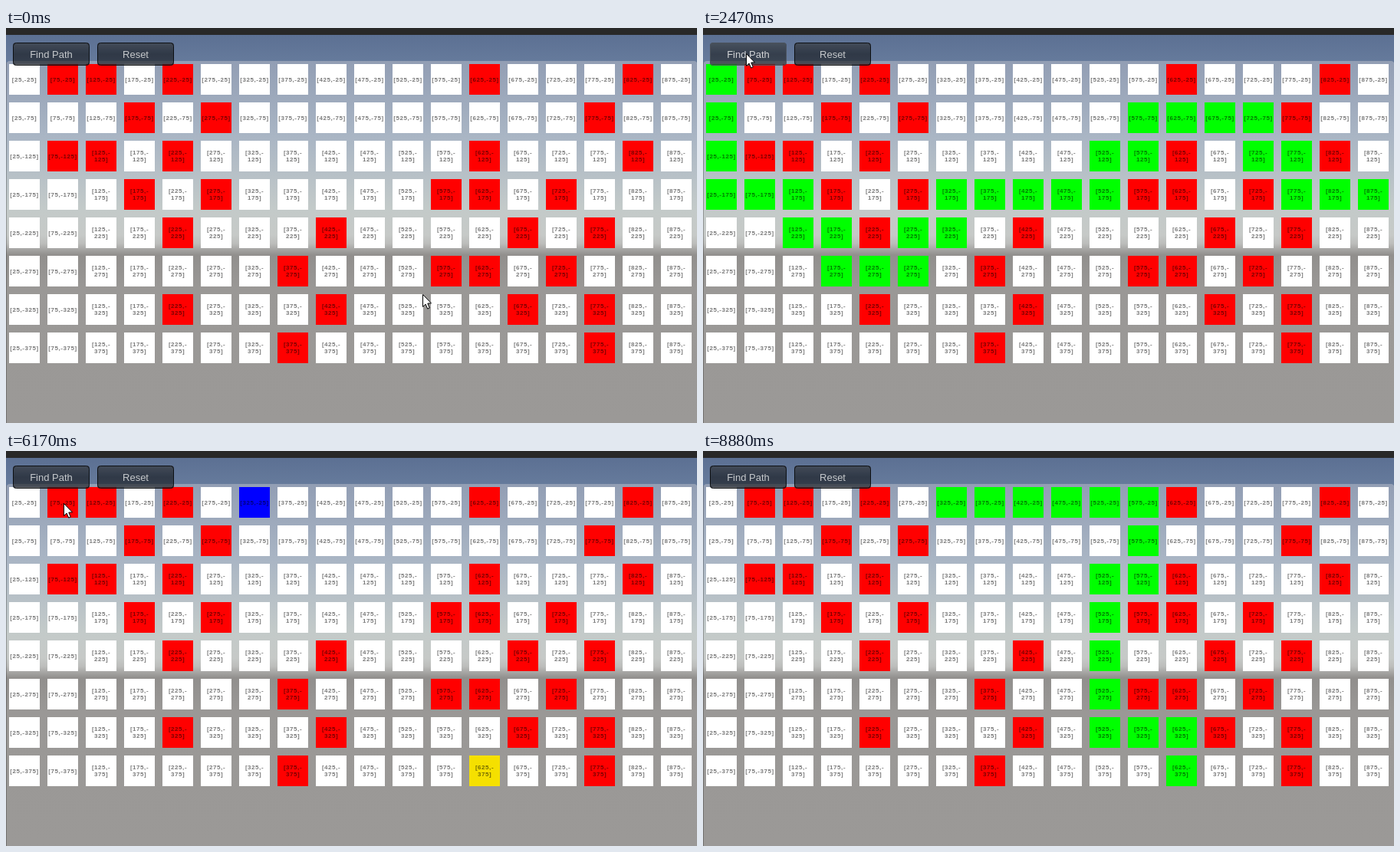
An HTML page with a canvas that plays this animation: 901 px wide and 515 px high, repeating every 9.43 s.

```html
<!DOCTYPE html>
<html lang="en">
<head>
<meta charset="utf-8">
<title>Grid path finder</title>
<style>
html, body { margin: 0; width: 100%; height: 100%; overflow: hidden; background: #9b9997; }
canvas { display: block; width: 901px; height: 515px; }
</style>
</head>
<body>
<canvas id="stage" width="901" height="515"></canvas>
<script>
const ctx = document.getElementById('stage').getContext('2d');
const W = 901, H = 515, LOOP = 9430, TICKS = 122;
const STEP = LOOP / TICKS;
const BLUE = '#0000ff', YELLOW = '#f5e000', GREEN = '#00ff00', RED = '#ff0000';

const WALLS = [
  '.##.#.......#...#.',
  '...#.#.........#..',
  '.##.#.......#...#.',
  '...#.#.....##.#...',
  '....#...#....#.#..',
  '.......#...##.#...',
  '....#...#....#.#..',
  '.......#.......#..'
];

// Follows letters U, D, L, R from a starting cell; cells are "col,row" keys.
function walk(col, row, turns) {
  const cells = [`${col},${row}`];
  for (const turn of turns) {
    col += (turn === 'R') - (turn === 'L');
    row += (turn === 'D') - (turn === 'U');
    cells.push(`${col},${row}`);
  }
  return cells;
}
const longPath = walk(0, 0, 'DDDRRDRDRRURURRRRURURRRDRDRR');
const shortPath = walk(6, 0, 'RRRRRDDLDDDDRRD');

// The pointer's script: each call moves the clock on by some ticks.
const moves = [], presses = [];
let clock = 0, tip = [543, 347];

function go(ticks, x, y) {
  moves.push({ from: clock, to: clock + ticks, a: tip, b: [x, y] });
  clock += ticks;
  tip = [x, y];
}
function wait(ticks) { clock += ticks; }
function press(color, cells) {
  presses.push({ down: clock + 1, up: clock + 2, color, cells });
  clock += 2;
}
function choose(color, path) { press(color, [path.at(color === BLUE ? 0 : -1)]); }
function reset() { press(null, []); }

go(4, 14, 66);
choose(BLUE, longPath);
go(6, 720, 256);
go(3, 870, 212);
choose(YELLOW, longPath);
go(12, 56, 33);
wait(1);
press(GREEN, longPath);
wait(5);
go(6, 614, 174);
go(9, 190, 25);
reset();
go(4, 322, 65);
choose(BLUE, shortPath);
go(6, 662, 421);
go(3, 622, 415);
choose(YELLOW, shortPath);
go(9, 75, 68);
go(4, 78, 44);
press(GREEN, shortPath);
wait(3);
go(2, 61, 44);
wait(1);
go(4, 306, 9);
go(3, 269, 19);
wait(3);
go(4, 392, 39);
wait(1);
go(4, 727, 469);
go(3, 365, 30);
const gone = clock + 1;

const easeOut = p => 1 - (1 - p) ** 1.5;

function pointerAt(tick) {
  const move = moves.findLast(m => m.from <= tick);
  const p = easeOut(Math.min(1, (tick - move.from) / (move.to - move.from)));
  return move.a.map((v, i) => Math.round(v + (move.b[i] - v) * p));
}

function paintAt(tick) {
  const paint = new Map();
  for (const { up, color, cells } of presses) {
    if (up > tick) break;
    if (!color) paint.clear();
    for (const cell of cells) paint.set(cell, color);
  }
  return paint;
}

function vertical(y0, y1, ...stops) {
  const g = ctx.createLinearGradient(0, y0, 0, y1);
  for (const [y, color] of stops) g.addColorStop((y - y0) / (y1 - y0), color);
  return g;
}
const SKY = vertical(9, 45, [9, '#5c7093'], [45, '#667b9c']);
const PANEL = vertical(43, H, [43, '#929eb4'], [140, '#a9b5c4'], [235, '#c3cac9'],
  [270, '#c6c9c7'], [281, '#bcbdbb'], [296, '#918f8d'], [340, '#9a9896'], [H, '#9b9997']);
const GLOSS = vertical(19, 49, [19, 'rgba(255,255,255,0.1)'], [34, 'rgba(255,255,255,0)'],
  [49, 'rgba(255,255,255,0.03)']);

function rounded(x, y, w, h, r) {
  ctx.beginPath();
  ctx.roundRect(x, y, w, h, r);
}

function drawBackdrop() {
  ctx.fillStyle = '#282828';
  ctx.fillRect(0, 0, W, 9);
  ctx.fillStyle = SKY;
  ctx.fillRect(0, 9, W, 36);
  ctx.fillStyle = PANEL;
  ctx.fillRect(0, 45, W, H - 45);
  rounded(1, 43, W - 1, 10, [4, 4, 0, 0]);
  ctx.fill();
  ctx.fillStyle = 'rgba(0,0,0,0.25)';
  ctx.fillRect(0, 45, 1, H - 45);
}

function drawCells(tick) {
  const paint = paintAt(tick);
  ctx.font = 'bold 8px "Liberation Sans", Arial, sans-serif';
  ctx.letterSpacing = '0.55px';
  ctx.textAlign = 'center';
  WALLS.forEach((line, row) => [...line].forEach((mark, col) => {
    const x = 4 + col * 50, y = 47 + row * 50;
    ctx.fillStyle = mark === '#' ? RED : paint.get(`${col},${row}`) || '#fff';
    ctx.fillRect(x, y, 40, 40);
    ctx.fillStyle = 'rgba(0,0,0,0.52)';
    const head = `[${col * 50 + 25},-`, tail = `${row * 50 + 25}]`;
    if (col > 1 && row > 1) {
      ctx.fillText(head, x + 20, y + 18);
      ctx.fillText(tail, x + 20, y + 27);
    } else {
      ctx.fillText(head + tail, x + 20, y + 23);
    }
  }));
  ctx.letterSpacing = '0px';
}

function drawButton(label, x, [px, py], active) {
  const hover = active && px >= x && px < x + 100 && py >= 19 && py < 49;
  rounded(x, 19, 100, 30, 4);
  ctx.fillStyle = hover ? 'rgba(26,29,32,0.62)' : 'rgba(20,23,26,0.64)';
  ctx.fill();
  ctx.fillStyle = GLOSS;
  ctx.fill();
  rounded(x + 0.5, 19.5, 99, 29, 4);
  ctx.lineWidth = 1;
  ctx.strokeStyle = hover ? '#4a525c' : '#0d1013';
  ctx.stroke();
  ctx.font = '13px "Liberation Sans", Arial, sans-serif';
  ctx.fillStyle = hover ? '#d2d4d6' : '#c6c9cc';
  ctx.fillText(label, x + 50, 39);
}

function drawPress(x, y) {
  ctx.beginPath();
  ctx.arc(x - 1, y, 12, 0, Math.PI * 2);
  ctx.fillStyle = 'rgba(220,205,20,0.7)';
  ctx.fill();
}

const ARROW = new Path2D('M0 0V16L3.6 12.6L6.2 18.6L8.8 17.5L6.3 11.6L11 11.4Z');
function drawPointer(x, y) {
  ctx.save();
  ctx.translate(x + 0.5, y + 0.5);
  ctx.fillStyle = '#fff';
  ctx.fill(ARROW);
  ctx.strokeStyle = '#000';
  ctx.lineWidth = 1;
  ctx.stroke(ARROW);
  ctx.restore();
}

function draw(tick) {
  const tipNow = pointerAt(tick), active = tick < gone;
  drawBackdrop();
  drawCells(tick);
  drawButton('Find Path', 9, tipNow, active);
  drawButton('Reset', 119, tipNow, active);
  if (presses.some(p => p.down === tick)) drawPress(...tipNow);
  if (active) drawPointer(...tipNow);
}

let shown = -1;
const begin = performance.now();
function loop() {
  const t = (performance.now() - begin) % LOOP;
  const tick = Math.floor(t / STEP + 0.2) % TICKS;
  if (tick !== shown) draw(shown = tick);
  requestAnimationFrame(loop);
}
loop();
</script>
</body>
</html>
```
